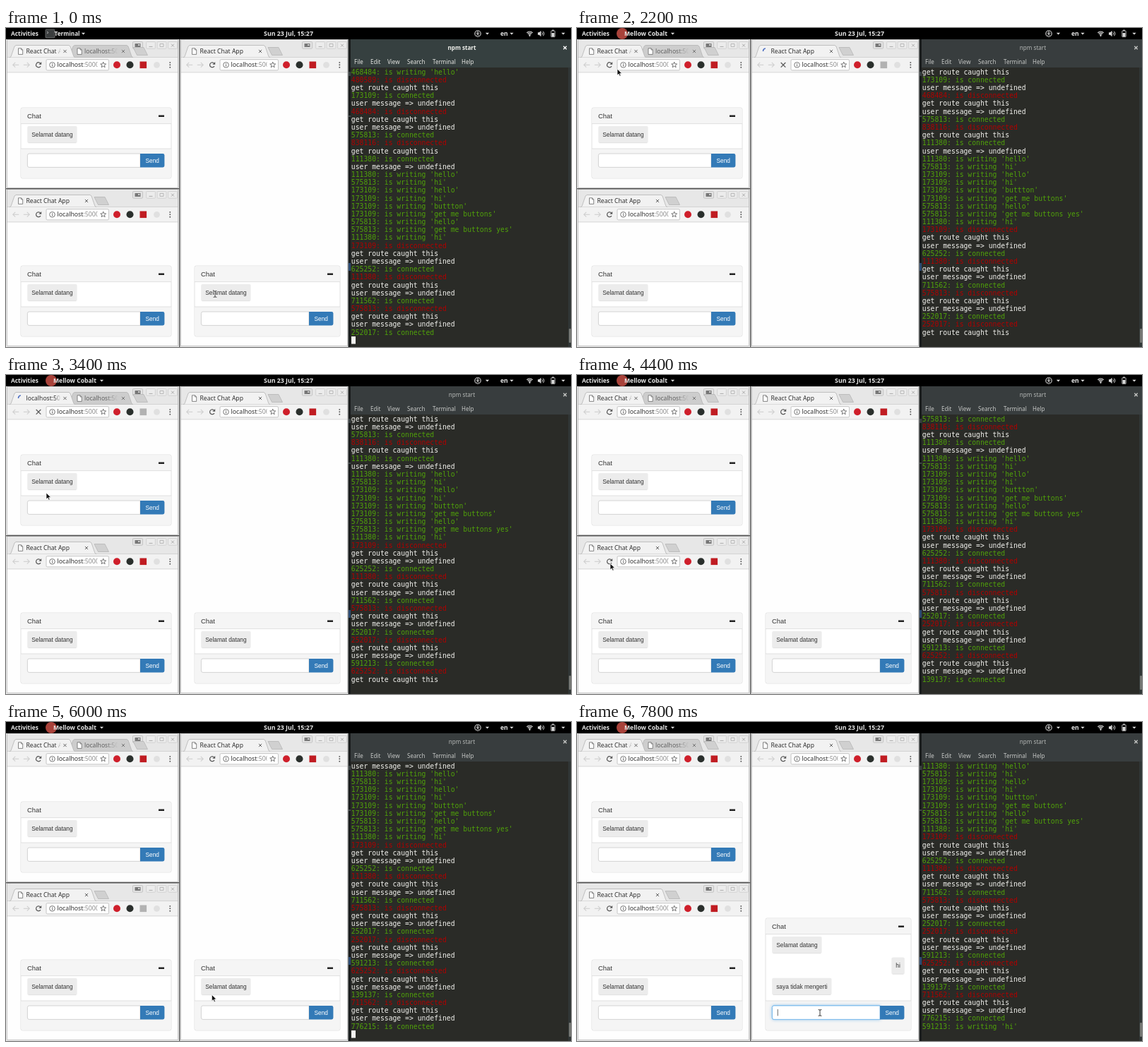
Animation of 800x452 px, one loop 8 s. Source, as an HTML page with a canvas:

```html
<!DOCTYPE html>
<html lang="en">
<head>
<meta charset="utf-8">
<title>Chat demo</title>
<style>
html, body { margin: 0; width: 100%; height: 100%; overflow: hidden; background: #000; }
canvas { display: block; width: 800px; height: 452px; }
</style>
</head>
<body>
<canvas id="stage"></canvas>
<script>
const W = 800, H = 452, LOOP = 8000;
const UI = "'Noto Sans', 'Open Sans', sans-serif";
const PAGE = "'Liberation Sans', Arial, sans-serif";
const MONO = "'DejaVu Sans Mono', monospace";
const BODY = 8.35;
const cv = document.getElementById('stage');
const c = cv.getContext('2d');
const dpr = window.devicePixelRatio || 1;
cv.width = W * dpr;
cv.height = H * dpr;

// r: route, u: user message, + connected, - disconnected, > writing
const LOG = ("468484>hello|-480589|r|+173109|u|-468484|r|u|+575813|-838116|r|+111380|u|" +
  "111380>hello|575813>hi|173109>hello|173109>hi|173109>buttton|173109>get me buttons|" +
  "575813>hello|575813>get me buttons yes|111380>hi|-173109|r|u|+625252|-111380|r|u|" +
  "+711562|-575813|r|u|+252017|-252017|r|u|+591213|-625252|r|u|+139137|-711562|r|u|" +
  "+776215|591213>hi").split('|').map(parse);
const ROWS = 34;
const SCROLL = [[0, 0], [1200, 2], [2400, 4], [3200, 6], [4000, 8], [5000, 10], [6000, 12], [7800, 13]];
const MOUSE = [[0, 296, 377], [150, 296, 377], [900, 296, 52], [1300, 296, 52], [2000, 57, 58],
  [2400, 57, 58], [2600, 49, 48], [3100, 49, 48], [3400, 57, 167], [4200, 47, 267],
  [4800, 47, 267], [5200, 54, 271], [6300, 344, 412], [8000, 344, 412]];

function parse(s) {
  if (s === 'r') return ['get route caught this', '#f2f2ee'];
  if (s === 'u') return ['user message => undefined', '#f2f2ee'];
  if (s[0] === '+') return [s.slice(1) + ': is connected', '#50a20a'];
  if (s[0] === '-') return [s.slice(1) + ': is disconnected', '#b00000'];
  const [id, msg] = s.split('>');
  return [`${id}: is writing '${msg}'`, '#50a20a'];
}

const within = (t, a, b) => t >= a && t < b;

function rect(x, y, w, h, fill) {
  c.fillStyle = fill;
  c.fillRect(x, y, w, h);
}

function box(x, y, w, h, r, fill, stroke) {
  c.beginPath();
  c.roundRect(x, y, w, h, r);
  if (fill) { c.fillStyle = fill; c.fill(); }
  if (stroke) { c.strokeStyle = stroke; c.lineWidth = 0.8; c.stroke(); }
}

function poly(pts, fill, stroke, lw = 0.8, open = false) {
  c.beginPath();
  for (let i = 0; i < pts.length; i += 2) c.lineTo(pts[i], pts[i + 1]);
  if (!open) c.closePath();
  if (fill) { c.fillStyle = fill; c.fill(); }
  if (stroke) { c.strokeStyle = stroke; c.lineWidth = lw; c.stroke(); }
}

const line = (pts, color, lw = 1) => poly(pts, null, color, lw, true);

function disc(x, y, r, fill) {
  c.beginPath();
  c.arc(x, y, r, 0, 7);
  c.fillStyle = fill;
  c.fill();
}

function arc(x, y, r, a, b, color, lw = 1) {
  c.beginPath();
  c.arc(x, y, r, a, b);
  c.strokeStyle = color;
  c.lineWidth = lw;
  c.stroke();
}

// y is the middle of the line
function text(s, x, y, size, font, color, align = 'left', weight = 400) {
  c.font = `${weight} ${size}px ${font}`;
  c.textAlign = align;
  c.fillStyle = color;
  c.fillText(s, x, y + size * 0.35);
}

function cross(x, y, r, color, lw = 1) {
  line([x - r, y - r, x + r, y + r], color, lw);
  line([x + r, y - r, x - r, y + r], color, lw);
}

const chevron = (x, y) => poly([x - 2.6, y - 1.2, x + 2.6, y - 1.2, x, y + 1.6], '#ddd');

function fade(x0, x1, color) {
  const g = c.createLinearGradient(x0, 0, x1, 0);
  g.addColorStop(0, color);
  g.addColorStop(1, color + '00');
  return g;
}

function panel(focus) {
  rect(0, 0, W, 16, '#000');
  text('Activities', 7, 8, 8.4, UI, '#e6e6e6', 'left', 600);
  if (focus) {
    c.save();
    c.beginPath();
    c.rect(50, 0, 100, 16);
    c.clip();
    disc(64, 8, 8, '#a8423a');
    c.restore();
    text('Mellow Cobalt', 67, 8, 8.6, UI, '#e6e6e6', 'left', 600);
    chevron(135.5, 8);
  } else {
    box(56, 2, 13, 12, 1, '#3a3d3e', '#777');
    line([58, 5, 60, 6.5, 58, 8], '#ccc', 0.8);
    text('Terminal', 68.5, 8, 8.2, UI, '#e6e6e6', 'left', 600);
    chevron(109.5, 8);
  }
  text('Sun 23 Jul, 15:27', 400, 8, 8.8, UI, '#e6e6e6', 'center', 600);
  arc(668, 8, 4.2, 0, 7, '#ddd', 1.1);
  disc(668, 5.6, 0.8, '#ddd');
  line([665.6, 7.2, 670.4, 7.2], '#ddd', 0.9);
  line([666.6, 10.8, 668, 7.4, 669.4, 10.8], '#ddd', 0.9);
  chevron(681.5, 8);
  text('en', 700, 8, 8.6, UI, '#e6e6e6', 'left', 600);
  chevron(716, 8);
  for (const r of [2.2, 4.2, 6.2]) arc(741.5, 11.4, r, -2.3, -0.84, '#ddd', 1.2);
  disc(741.5, 11, 1, '#ddd');
  poly([753, 6.3, 755, 6.3, 757.5, 3.8, 757.5, 12.2, 755, 9.7, 753, 9.7], '#ddd');
  arc(757.5, 8, 2.2, -0.9, 0.9, '#ddd', 1);
  arc(757.5, 8, 4.3, -0.9, 0.9, '#ddd', 1);
  box(771.8, 4, 5.4, 8.6, 0.6, null, '#ddd');
  rect(773.3, 2.6, 2.4, 1.4, '#ddd');
  rect(772.6, 7, 3.8, 5, '#ddd');
  chevron(789, 8);
}

function terminal(t, focus) {
  rect(484.5, 16, 3.5, 436, '#191c1c');
  rect(485, 333, 3, 11, '#2d4c74');
  rect(485, 62, 3, 6, '#3a4143');
  rect(485, 124, 3, 2, '#42484a');
  rect(488, 16, 312, 40, focus ? '#364040' : '#383d3e');
  rect(488, 56, 312, 396, '#2a2b27');
  text('npm start', 645.5, 28, 8.1, UI, focus ? '#f0f0ec' : '#b4b7b5', 'center', focus ? 600 : 400);
  cross(791.5, 28, 2.2, focus ? '#fff' : '#c4c6c4', 1.3);
  const menu = [['File', 493], ['Edit', 516], ['View', 540], ['Search', 568], ['Terminal', 604], ['Help', 645]];
  for (const [s, x] of menu) text(s, x, 48, 8, UI, focus ? '#e6e6e2' : '#c6c8c6');

  const top = SCROLL.filter(k => k[0] <= t).pop()[1];
  c.font = `9.75px ${MONO}`;
  c.textAlign = 'left';
  for (let i = 0; i < ROWS; i++) {
    const [s, color] = LOG[top + i];
    c.fillStyle = color;
    c.fillText(s, 488.8, 65.7 + i * 11.18);
  }
  if (Math.floor(t / 600) % 2 === 0) rect(489, 437, 6, 10.6, '#f4f4f0');
  rect(796, 56, 4, 396, '#303635');
  box(797, 426, 3, 20, 1, '#747672');
}

function pageIcon(x, y) {
  poly([x - 3, y - 4.2, x + 1, y - 4.2, x + 3.2, y - 2, x + 3.2, y + 4.4, x - 3, y + 4.4], '#fff', '#666');
  line([x + 1, y - 4.2, x + 1, y - 2, x + 3.2, y - 2], '#666', 0.7);
}

function tab(x0, x1, y, fill) {
  poly([x0, y + 9, x0 + 2, y + 7.5, x0 + 7, y - 7, x0 + 9, y - 8.5, x1 - 9, y - 8.5,
    x1 - 7, y - 7, x1 - 2, y + 7.5, x1, y + 9], fill, '#b4b4b4');
}

function newTab(x, y) {
  poly([x, y - 5.5, x + 15, y - 5.5, x + 20.5, y + 5.5, x + 5.5, y + 5.5], '#d0d0d0', '#b6b6b6');
}

function arrow(x, y, d) {
  line([x - 4.2, y, x + 4.2, y], '#cfcfcf', 1.1);
  line([x + d * 0.8, y - 3.4, x + d * 4.2, y, x + d * 0.8, y + 3.4], '#cfcfcf', 1.1);
}

function reload(x, y) {
  arc(x, y, 3.4, 0.5, 5.5, '#555', 1.2);
  poly([x + 4.2, y - 4.4, x + 4.2, y - 0.5, x + 0.4, y - 0.5], '#555');
}

function star(x, y) {
  const pts = [];
  for (let i = 0; i < 10; i++) {
    const r = i % 2 ? 1.8 : 4.2, a = i * Math.PI / 5 - Math.PI / 2;
    pts.push(x + r * Math.cos(a), y + r * Math.sin(a));
  }
  poly(pts, null, '#666', 0.9);
}

function controls(x, y) {
  box(x - 56.5, y - 5, 14, 9.6, 1, '#e4e4e4', '#bcbcbc');
  rect(x - 53.5, y - 2.6, 8, 5, '#777');
  rect(x - 49, y - 1.4, 2.4, 1.6, '#e4e4e4');
  for (const dx of [-31, -15.5, 0]) box(x + dx - 6.4, y - 5, 12.8, 9.6, 1, '#ececec', '#cdcdcd');
  line([x - 33.5, y + 1.8, x - 28.5, y + 1.8], '#aaa');
  box(x - 18, y - 2.2, 5, 4, 0, null, '#aaa');
  cross(x, y, 2, '#aaa');
}

// dx moves left-aligned parts, rx right-aligned parts
function browser(dx, rx, dy, bottom, two, s, t) {
  const x = dx + 1, r = rx + 244, top = dy + 16.5, y = dy + 33, ty = dy + 52.3;
  rect(x, top, r - x, bottom - top, '#e7e7e7');
  line([x + 6, top + 0.5, r, top + 0.5], '#f8f8f8', 0.8);
  controls(rx + 236, dy + 24.6);
  if (two) {
    tab(88, 180, y, '#cdcdcd');
    pageIcon(104, y);
    text('localhost:50', 111, y, 8.6, UI, fade(142, 159, '#606060'));
    cross(166, y, 2.1, '#777');
    newTab(180, y);
  } else newTab(dx + 125, y);
  line([x, dy + 42, r, dy + 42], '#b4b4b4', 0.8);
  const end = two ? 98 : dx + 128;
  tab(dx + 5, end, y, '#f2f2f2');
  rect(x, dy + 42, r - x, 21, '#f2f2f2');
  if (s.spin) {
    const a = Math.PI * (2 * (t - 2200) / 600 - 1);
    arc(dx + 21.5, y, 4, a, a + 1.4, '#4468c0', 1.5);
  } else pageIcon(dx + 20.5, y);
  text(s.title || 'React Chat App', dx + 28.5, y, 8.6, UI, two ? fade(69, 78, '#303030') : '#303030');
  cross(two ? 83.5 : dx + 114, y, 2.1, '#666');

  arrow(dx + 14, ty, -1);
  arrow(dx + 29, ty, 1);
  if (s.hover) box(dx + 38.5, ty - 8, 16, 16, 1.5, '#dedede', '#c4c4c4');
  if (s.stop) cross(dx + 46, ty, 3.3, '#555', 1.2);
  else reload(dx + 46, ty);
  box(dx + 57, ty - 7.6, rx + 145.5 - dx - 57, 15.2, 1.6, '#fff', '#b8b8b8');
  arc(dx + 65.5, ty, 3.8, 0, 7, '#666', 0.9);
  rect(dx + 65, ty - 0.7, 1, 2.8, '#666');
  rect(dx + 65, ty - 2.3, 1, 1, '#666');
  c.save();
  c.beginPath();
  c.rect(dx + 70, ty - 7, rx + 129.5 - dx - 70, 14);
  c.clip();
  text('localhost', dx + 72.5, ty, 8.75, UI, '#333');
  text(':5000', dx + 72.5 + c.measureText('localhost').width, ty, 8.75, UI, '#8c8c8c');
  c.restore();
  star(rx + 137.7, ty);
  disc(rx + 157, ty, 5, '#cf1f2b');
  disc(rx + 175.5, ty, 5, '#2a2f2c');
  rect(rx + 189.5, ty - 4.8, 9.6, 9.6, s.grey ? '#b2b2b2' : '#c01c22');
  disc(rx + 213.5, ty, 4.4, '#e0e0e0');
  for (const k of [-3.4, 0, 3.4]) disc(rx + 232.3, ty + k, 0.95, '#555');
  line([x, dy + 63, r, dy + 63], '#c6c6c6', 0.8);
  rect(x, dy + 63.4, r - x, bottom - dy - 63.4, '#fefefe');
  box(x + 0.5, top, r - x - 1, bottom - top, 0, null, '#b9b9b9');
}

function bubble(s, x, y, right) {
  c.font = `${BODY}px ${PAGE}`;
  const w = c.measureText(s).width + 12;
  if (right) x -= w;
  box(x, y, w, 24, 2, '#ececec');
  line([x + 1.5, y + 23.7, x + w - 1.5, y + 23.7], '#dfdfdf', 0.8);
  text(s, x + 6, y + 12, BODY, PAGE, '#333');
}

function chat(x, bottom, w, s) {
  const top = bottom - (s.replied ? 159 : 100), iy = bottom - 35, bx = x + w - 44;
  const field = [x + 9.4, iy, bx - x - 9.4, 19.4, [2.4, 0, 0, 2.4], '#fff'];
  box(x, top, w, bottom - top, 2.4, '#fff', '#dadada');
  box(x + 0.4, top + 0.4, w - 0.8, 22, [2, 2, 0, 0], '#f5f5f5');
  line([x, top + 22.6, x + w, top + 22.6], '#dadada', 0.8);
  text('Chat', x + 9, top + 11.8, 9.4, PAGE, '#333');
  rect(x + w - 18, top + 10.5, 8, 2.5, '#222');
  bubble('Selamat datang', x + 9.2, top + 26);
  if (s.replied) {
    bubble('hi', x + w - 9.2, top + 55.4, true);
    bubble('saya tidak mengerti', x + 9.2, top + 84.8);
  }
  box(x + 0.4, bottom - 42, w - 0.8, 41.6, [0, 0, 2, 2], '#f5f5f5');
  line([x, bottom - 42, x + w, bottom - 42], '#dadada', 0.8);
  if (s.focus) {
    c.save();
    c.shadowColor = 'rgba(102,175,233,0.6)';
    c.shadowBlur = 4.5 * dpr;
    box(...field, '#66afe9');
    c.restore();
  }
  box(...field, s.focus ? '#66afe9' : '#cacaca');
  box(bx, iy, 34.4, 19.4, [0, 2.4, 2.4, 0], '#337ab7');
  text('Send', bx + 17.2, iy + 9.8, BODY, PAGE, '#fff', 'center');
  if (s.focus) {
    text(s.typed, x + 16.8, iy + 9.8, BODY, PAGE, '#555');
    if (s.caret) rect(x + 16.8 + c.measureText(s.typed).width, iy + 5, 0.8, 9.4, '#444');
  }
}

function pointer(t) {
  const i = MOUSE.findIndex(k => k[0] > t);
  const [t0, x0, y0] = MOUSE[i - 1], [t1, x1, y1] = MOUSE[i];
  const p = (t - t0) / (t1 - t0), e = p * p * (3 - 2 * p);
  const x = x0 + (x1 - x0) * e, y = y0 + (y1 - y0) * e;
  const overText = (t < 1000 && y > 368) || (t > 5400 && x > 276 && y > 400);
  if (overText) {
    for (const [col, lw] of [['#fff', 2], ['#222', 0.9]]) {
      line([x, y - 4, x, y + 4], col, lw);
      line([x - 2.4, y - 4.4, x, y - 4, x + 2.4, y - 4.4], col, lw);
      line([x - 2.4, y + 4.4, x, y + 4, x + 2.4, y + 4.4], col, lw);
    }
  } else {
    poly([x, y, x, y + 9, x + 2.1, y + 7.1, x + 3.6, y + 10.3, x + 5.1, y + 9.6,
      x + 3.7, y + 6.5, x + 6.5, y + 6.3], '#111', '#fff', 0.7);
  }
}

function draw(t) {
  const focused = t >= 1000;
  c.setTransform(dpr, 0, 0, dpr, 0, 0);
  rect(0, 0, W, H, '#e9e9e9');
  panel(focused);

  browser(0, 0, 0, 226.5, true, {
    spin: within(t, 3200, 4200), stop: within(t, 3200, 4200), grey: within(t, 3400, 4200),
    hover: within(t, 2600, 3400), title: within(t, 3200, 3600) && 'localhost:50'
  }, t);
  if (!within(t, 3600, 4000)) chat(21, 213, 213, {});

  browser(0, 0, 212, 450.5, false, {
    spin: within(t, 5000, 6000), grey: within(t, 5200, 6200)
  }, t);
  if (!within(t, 5400, 6000)) chat(21, 437, 213, {});

  browser(246, 240, 0, 450.5, false, {
    spin: within(t, 1200, 2400), stop: within(t, 1000, 2600), grey: within(t, 1400, 2600),
    hover: within(t, 800, 1400)
  }, t);
  if (!within(t, 1400, 2400)) {
    chat(267, 437, 206, {
      focus: t >= 6600, replied: t >= 7800, caret: !within(t, 7000, 7200),
      typed: within(t, 7200, 7400) ? 'h' : within(t, 7400, 7800) ? 'hi' : ''
    });
  }
  rect(0, 227.2, 245, 1.1, '#333');
  rect(245.2, 16, 1.1, 436, '#333');

  terminal(t, !focused);
  pointer(t);
}

const start = performance.now();
function tick() {
  draw((performance.now() - start) % LOOP);
  requestAnimationFrame(tick);
}
tick();
</script>
</body>
</html>
```
